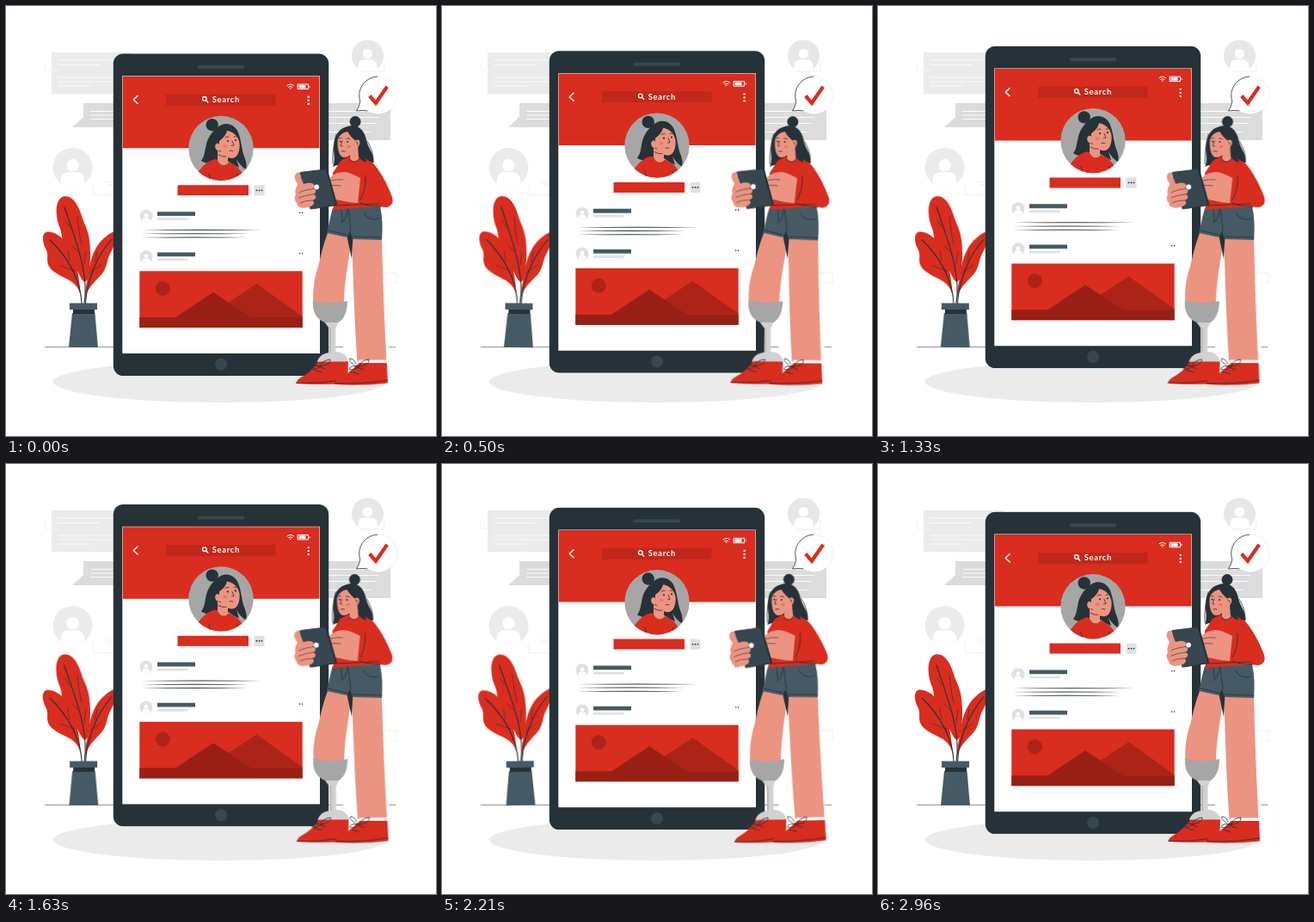
Recreate the animation shown at these times as an HTML page. Size 500 px wide and 500 px high, loop 3000 ms.

```html
<!DOCTYPE html>
<html lang="en">
<head>
<meta charset="utf-8">
<title>Profile page</title>
<style>
html, body { margin: 0; width: 100%; height: 100%; overflow: hidden; background: #fff; }
svg { display: block; width: 100vw; height: 100vh; }
.float { animation: float 3s -40ms linear infinite; }
.sway { animation: sway 3s -40ms linear infinite; }
#plant { transform-origin: 85px 309px; }
#girl { transform-origin: 393px 284px; }
@keyframes float {
  0%, 100% { transform: translateY(.27px); }
  50% { transform: translateY(-9.73px); }
}
@keyframes sway {
  0%, 100% { transform: rotate(0deg); }
  25% { transform: rotate(1deg); }
  75% { transform: rotate(-1deg); }
}
.red { fill: #d92d1f; }
.dark { fill: #263238; }
.slate { fill: #455a64; }
.skin { fill: #eb9481; }
.pale { fill: #ebebeb; }
.grey { fill: #e0e0e0; }
.mid { fill: #dcdcdc; }
.line { fill: none; stroke: #263238; stroke-width: .8; stroke-linecap: round; stroke-linejoin: round; }
.white { fill: none; stroke: #fff; stroke-linecap: round; stroke-linejoin: round; }
.faint { fill: none; stroke: #e6e6e6; stroke-width: .6; }
text { font: 700 9.4px Lato, "Open Sans", sans-serif; letter-spacing: .7px; fill: #fff; }
</style>
</head>
<body>
<svg viewBox="0 0 500 500">
  <defs>
    <clipPath id="disc"><circle r="20"/></clipPath>
    <clipPath id="photo"><circle cx="250" cy="165.5" r="37.7"/></clipPath>
    <g id="person">
      <circle r="20"/>
      <g clip-path="url(#disc)" fill="#fff">
        <circle cy="-2.5" r="6.2"/>
        <path d="M-12 20V13Q-11.500 4.500 -4 4.500H4Q11.500 4.500 12 13V20Z"/>
      </g>
    </g>
    <g id="post">
      <use href="#person" class="grey" transform="translate(163 244.500) scale(.375)"/>
      <path class="slate" d="M176 239.200h44v4.800h-44z"/>
      <path class="grey" d="M176 246.400h35.300v2.700h-35.300z"/>
      <g class="dark"><circle cx="341.700" cy="240.500" r=".8"/><circle cx="344.500" cy="240.500" r=".8"/></g>
    </g>
  </defs>

  <!-- backdrop -->
  <path class="pale" d="M53 54h93v48.300H53z"/>
  <path class="white" stroke-width=".8" d="M61 63h69M61 68.500h47M61 83h69M61 88h69M61 93h37"/>
  <path class="mid" d="M90 113h56v28H77l13-12z"/>
  <path class="white" stroke-width=".9" d="M99 122.500h30M99 127h30M99 131.500h30"/>
  <use href="#person" class="pale" transform="translate(77.500 188) scale(1.150)"/>
  <use href="#person" fill="#e7e7e7" transform="translate(420.500 58) scale(.93)"/>
  <path class="mid" d="M370 113h77v43h-77z"/>
  <path class="white" stroke-width=".9" d="M375 122.500h58M375 129.500h58M375 136.500h55M375 146.500h49"/>
  <path class="faint" d="M45 66v9h7M118 208h8M101 208v11.500h24M114 205h11M412 76h28V65M437 310h17v12h-8"/>
  <path fill="none" stroke="#263238" stroke-width=".5" d="M45 396.500h347M445 396.500h8"/>
  <ellipse class="pale" cx="249" cy="437" rx="194" ry="24"/>

  <!-- speech bubble -->
  <path fill="#fff" d="M411.800 111A22 22 0 1 1 420 121.800Q414 121 407.500 122Q411 117 411.800 111Z"/>
  <path class="line" d="M432 82A22 22 0 0 0 411.800 111Q411 117 407.500 122Q414 121 420 121.800"/>
  <path class="line" style="stroke:#bbb;stroke-dasharray:.8 3;stroke-width:.5" d="M420 121.800A22 22 0 1 0 432 82"/>
  <path fill="none" stroke="#d92d1f" stroke-width="4.200" d="M422.800 104.500l7.200 8.300L443.200 93.700"/>

  <!-- plant -->
  <g id="plant" class="sway">
    <path class="red" d="M87 338C85 328 80 322 72 318C60 312 50 307 48.500 299C47 293 50 290 46 282C42 275 41 264 48 262.500C58 262 68 271 74 281C81 293 85 312 87 338Z"/>
    <path class="red" d="M92 338C92 328 95 318 96 310C98 292 105 277 114 270C120 265 125 261 130 262C129 274 124 282 121 288C117 295 118 303 112 311C105 319 97 325 92 338Z"/>
    <path class="red" d="M92 321C88 319 87 316 84 310C79 301 79 293 72 285C64 277 66 268 63 259C57 247 56 224 67 221.500C78 220 84 232 88 244C90 252 95 258 97 272C99 288 98 304 95 318Z"/>
    <path class="line" style="stroke-width:1.100" d="M88 346C87 318 71 291 51 272M91 346C97 311 80 270 68 234M92.500 346C94 320 105 291 123 271"/>
    <path class="line" style="stroke-width:.6" d="M74 297l-2-12M80 308l-17-6M74 257l-5-8M84 286l-8-8M83 245q2 22 5 32M91 300l2-14M104 297l2-12M98 310l13-9"/>
    <path class="slate" d="M77 357h26.500L107 397H73Z"/>
    <path class="dark" d="M78 352h25v6H78z"/>
    <path class="slate" d="M74 345.500h32v7.500H74z"/>
  </g>

  <!-- tablet -->
  <g class="float">
    <rect class="dark" x="124.800" y="55.500" width="250.400" height="374.500" rx="11.500"/>
    <g fill="#37474f"><rect x="222.500" y="69" width="55" height="4" rx="2"/><circle cx="250" cy="416.800" r="7"/></g>
    <path fill="#fff" d="M135.300 81.300H365V404H135.300z"/>
    <path class="red" d="M135.800 81.800H364.500V165.300H135.800z"/>
    <path fill="#c0281b" d="M186 102.700h127.500v13H186z"/>
    <g class="white" stroke-width="1.400">
      <path d="M153 104.500l-4.800 4.500L153 113.500"/>
      <circle cx="230.800" cy="107.800" r="2.300"/>
      <path d="M232.600 109.700l2.200 2.200"/>
      <path stroke-width="1" d="M327 92.500q3.800-3.200 7.600 0M328.600 94.200q2.200-1.800 4.400 0"/>
      <path stroke-width="1" d="M339.500 91h12v5.500h-12zM353 93v1.500"/>
    </g>
    <g fill="#fff">
      <circle cx="330.800" cy="95.800" r=".8"/>
      <path d="M340.500 92h8v3.500h-8z"/>
      <circle cx="351.700" cy="105.700" r="1.200"/><circle cx="351.700" cy="109.700" r="1.200"/><circle cx="351.700" cy="113.700" r="1.200"/>
    </g>
    <text x="239.700" y="112">Search</text>

    <g clip-path="url(#photo)">
      <path fill="#a6a6a6" d="M210 126h80v80h-80z"/>
      <circle class="dark" cx="239.700" cy="138.200" r="7.200"/>
      <path class="dark" d="M245 142C254 133 266 137 270 147C274 157 274 167 277 175C280 182 280 187 279 190C274 187 270 182 268 178L271 188C264 185 260 181 257 180L247 182C241 184 233 184 227 180C232 174 231 165 234 157C237 150 240 146 245 142Z"/>
      <path class="red" d="M217 206C222 193 230 181 243 178L262 183C272 188 277 196 279 206Z"/>
      <path class="skin" d="M246 168L246 179C248 185 254 187 258 183L258 173Z"/>
      <path class="skin" d="M248 157C252 154 256 150 257 145C264 146 270 151 271.500 159C272.500 168 269 177 263 177C257 177 252 173 249 168C244 170 241 162 245 160C247 159 248 160 248 162Z"/>
      <path class="line" d="M247 173q5 3 9 2M255 153q2-2 4-1M265 152q2-1 3 0M263 157l2 5-2.500 .5M260 168.500q2.500-1 4 0M238 203l-2-8M268 203l1-8"/>
      <circle class="dark" cx="258" cy="157" r="1.100"/><circle class="dark" cx="267" cy="156" r="1.100"/>
      <ellipse cx="255" cy="163" rx="2.500" ry="1.800" fill="#d92d1f" opacity=".25"/>
    </g>

    <path class="red" d="M199.500 208.300H282v12h-82.500z"/>
    <path class="grey" d="M288.500 208.300h12v12.200h-12z"/>
    <g class="dark"><circle cx="291.500" cy="214.300" r=".9"/><circle cx="294.500" cy="214.300" r=".9"/><circle cx="297.500" cy="214.300" r=".9"/></g>

    <use href="#post"/>
    <path class="dark" d="M157 260.600Q227 259.600 298 260.600Q227 261.600 157 260.600M157 264.800Q220 263.800 283 264.800Q220 265.800 157 264.800M157 269Q219 268 281 269Q219 270 157 269"/>
    <use href="#post" y="47.200"/>
    <path class="red" d="M155.300 308.300h189.400V374H155.300z"/>
    <circle cx="182.200" cy="328.500" r="8.500" fill="#ac2418"/>
    <path fill="#ac2418" d="M232 362L291.500 323L344.700 361V362Z"/>
    <path fill="#982015" d="M197 362L241 333L285 362H344.700V374H155.300V362Z"/>
  </g>

  <!-- girl -->
  <g id="girl" class="sway">
    <!-- prosthetic leg -->
    <path class="skin" d="M374 264L402 270C399 294 393 321 393 347H358C356 333 358 318 363 303C366 290 369 277 374 264Z"/>
    <path fill="#d1d1d1" d="M370 367H387L383.500 375V402C391 402 397 406 398.500 414H362C364 407 369 404 376 403V375Z"/>
    <path fill="#b8b8b8" d="M376 374h2v29H376z"/>
    <path fill="#a6a6a6" d="M357 342C368 346 384 346 397 343C397 353 395 362 387 368H371C360 364 356 354 357 342Z"/>
    <path class="red" d="M337.500 438C340 432 346 431 352 426C358 421 361 416 364 413.500H398L397.500 431L393 439Q366 441 337.500 439Z"/>
    <path class="line" d="M338 438.500Q370 439 394 434M358 423l9 3M362 418l9 4M366 419q-8-2-11 2q4 3 11-2q1-7 11-8q1 6-11 8"/>
    <!-- standing leg -->
    <path class="skin" d="M402 268H437C438 316 440 365 442.500 413H408.500C405 365 404 318 402 268Z"/>
    <path fill="#fff" d="M410 411.500h32.500v4H410z"/>
    <path class="red" d="M382 439.500C384 433 390 432 396 428C403 423 407 418 411 415H443L444 438.500Q414 442 382 440Z"/>
    <path class="line" d="M383 438.500Q414 440 444 435M401 425l9 3M406 419l10 4M411 419q-10-2-12 3q5 3 12-3q1-7 11-8q1 7-11 8M405 417q-7-4-5-7q5 0 7 6"/>

    <!-- shorts -->
    <path class="dark" d="M392 258L404 258L402 294L396 266Z"/>
    <path class="slate" d="M380 235L435 233C438 246 438 259 437 272L403 271L400 262L396 269L373 264C376 253 377 244 380 235Z"/>
    <path class="line" d="M397 236q-1 14-7 16M390 237l1 13M401 262l-3-26M403 268l34 1M375 261l21 5M416 240q5 11 18 7"/>

    <!-- hair behind -->
    <circle class="dark" cx="406" cy="134.500" r="6.500"/>
    <path class="dark" d="M397 140C409 136 417 145 419 156C421 165 427 170 427.500 182C424 182 421 180 419 177L420 182C415 182 412 179 410 176C404 185 389 182 380 187C384 178 379 168 382 156C384 147 389 142 397 140Z"/>
    <path class="line" d="M384 149q-5 17-4 35M420 157q7 12 7 21"/>

    <!-- sweater -->
    <path class="red" d="M389 180C397 174 410 173 422 178C433 187 444 208 449 222C451 229 448 233 442 234L434 233L380 237C384 220 379 205 380 194Z"/>
    <path class="dark" d="M409 164L420 164Q427 171 427.500 182Q421 181 418 177L419 182Q411 179 408 172Z"/>
    <path class="skin" d="M400 166L400 177C402 182 408 182 410 177L409 162Z"/>
    <path class="line" d="M400 179q5 5 11-1M418 197q1 16-6 28M436 233q-13 1-24-4M384 232l49-2"/>

    <!-- face -->
    <path class="skin" d="M385.500 157C386 151 391 147 397 146C400 151 403 154 406 156.500C411 153 413 159 410 163C408 165 406 165 405 165C404 171 399 176 393 176C388 176 385 168 385.500 157Z"/>
    <path class="line" d="M387 154q2-1.500 3-.5M396 154q2-1 4 1M391 157l-2 5.500 2 .5M390 169q2-1 4 0M407 158q2 0 2 3"/>
    <circle class="dark" cx="388.500" cy="157.500" r="1"/><circle class="dark" cx="397" cy="158" r="1"/>
    <ellipse cx="398.500" cy="163.500" rx="2.400" ry="1.700" fill="#d92d1f" opacity=".25"/>

    <!-- arms and device -->
    <path class="skin" d="M412 200L409 229C399 229 391 226 383 225C376 220 373 211 374 204C378 196 384 194 392 193C400 193 406 197 412 200Z"/>
    <path class="dark" d="M342.500 193L372 189.500Q373.500 189.500 374 191L385 230Q385.300 232 383.500 232.300L355 236.500Z"/>
    <path fill="#37474f" d="M341 193.500L370 190Q371.500 190 372 191.500L383 231L353.500 236.500Z"/>
    <circle cx="361" cy="210.500" r="2.900" fill="#fff"/>
    <path class="skin" d="M337 195C340 192 343 195 343 200L346 207C352 205 358 205 358 209C359 211 357 212 355 213C361 212 362 217 357 219C362 220 361 225 356 226C360 228 358 232 352 234C344 236 338 234 338 229C335 226 335 222 337 219C335 214 338 211 339 207C336 202 334 199 337 195Z"/>
    <path class="line" style="stroke-width:.6" d="M355 213q-9 1-14 4M357 219q-9 1-16 4M356 226q-8 0-14 3M378 203q6-2 14-1M377 209q7-1 12 0"/>
  </g>
</svg>
</body>
</html>
```
